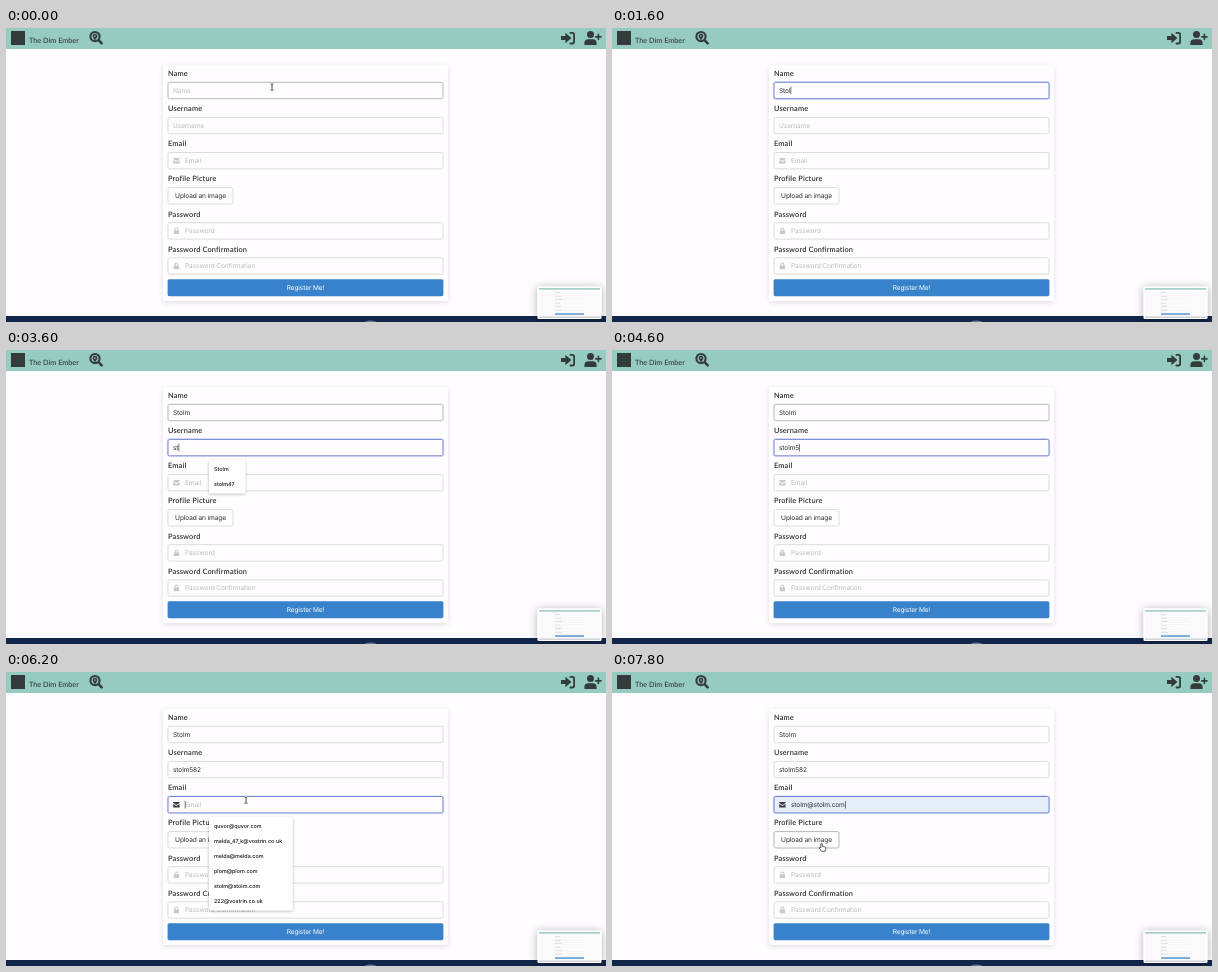
Recreate the animation shown at these times as an HTML page. Size 600x294 px, loop 8 s.

```html
<!DOCTYPE html>
<html lang="en">
<head>
<meta charset="utf-8">
<title>Registration form</title>
<style>
  html, body { margin: 0; width: 100%; height: 100%; overflow: hidden; background: #fefcfe; }
  svg { display: block; width: 600px; height: 294px; }
  text { font: 400 6.6px Inter, Roboto, sans-serif; letter-spacing: -.12px; fill: #2c2c2c; white-space: pre; text-rendering: geometricPrecision; }
  .label { font: 600 7.4px Lato, "Open Sans", sans-serif; letter-spacing: .14px; }
  .brand { font: 400 7.3px Lato, "Open Sans", sans-serif; letter-spacing: 0; }
  .option { font-weight: 500; font-size: 5.4px; letter-spacing: 0; fill: #111; }
  .middle { text-anchor: middle; }
  .hint { fill: #b9b9bb; }
  .box { fill: #fffdff; stroke: #d8d8da; stroke-width: .9; }
  .box.hover { stroke: #aeaeb2; }
  .box.focus { stroke: #6478cc; }
  .box.filled { fill: #e6eefc; }
  .ring { fill: none; stroke: #4a6fdc; stroke-opacity: .16; stroke-width: 1; }
  .icon { fill: #c9c9cb; }
  .icon.focus { fill: #3c3c3c; }
  .ink { fill: #343b3b; }
  .line { fill: none; stroke: #343b3b; }
</style>
</head>
<body>
<svg id="stage" viewBox="0 0 600 294">
  <defs>
    <filter id="soft" x="-20%" y="-20%" width="140%" height="140%">
      <feDropShadow dx="0" dy="1.5" stdDeviation="2.6" flood-color="#0a0a0a" flood-opacity=".12"/>
    </filter>
    <filter id="lift" x="-30%" y="-30%" width="160%" height="160%">
      <feDropShadow dx="0" dy="1" stdDeviation="1.5" flood-color="#000" flood-opacity=".3"/>
    </filter>
    <filter id="halo" x="-40%" y="-60%" width="180%" height="220%">
      <feDropShadow dx="0" dy="1" stdDeviation="4" flood-color="#000" flood-opacity=".32"/>
    </filter>
  </defs>

  <rect width="600" height="294" fill="#fefcfe"/>
  <rect width="600" height="21" fill="#95cbc1"/>
  <rect class="ink" x="5" y="3" width="14" height="14"/>
  <text class="brand" x="23" y="14.8">The Dim Ember</text>

  <circle class="line" cx="89" cy="8.6" r="4.6" stroke-width="2.1"/>
  <path class="ink" fill-rule="evenodd" d="M89 12.2c-1.4-1.8-2.4-2.8-2.4-4.1a2.4 2.4 0 0 1 4.8 0c0 1.3-1 2.3-2.4 4.1zM89 7.3a.8.8 0 1 0 0 1.6a.8.8 0 0 0 0-1.6z"/>
  <path class="line" stroke-width="2.5" stroke-linecap="round" d="M92.8 12.4l2.9 2.9"/>

  <path class="ink" d="M555 8.1h4.4V4.7l6 5.3-6 5.3v-3.4H555z"/>
  <path class="line" stroke-width="1.8" stroke-linecap="round" d="M564.4 4.9h2a1.7 1.7 0 0 1 1.7 1.7v7.2a1.7 1.7 0 0 1-1.7 1.7h-2"/>
  <circle class="ink" cx="584.5" cy="6.6" r="3.5"/>
  <path class="ink" d="M578.4 17v-1.8a4 4 0 0 1 4-4h4.2a4 4 0 0 1 4 4V17z"/>
  <path class="line" stroke-width="1.6" stroke-linecap="round" d="M592.4 6.3v5.2M589.8 8.9h5.2"/>

  <rect x="157" y="37" width="285" height="236" rx="2.6" fill="#fffdff" filter="url(#soft)"/>
  <g id="form"></g>
  <rect x="161.6" y="251.2" width="275.8" height="17" rx="1.6" fill="#3782cb"/>
  <text class="middle" x="299.5" y="262.3" style="fill:#fff">Register Me!</text>

  <rect y="288" width="600" height="6" fill="#12264a"/>
  <ellipse cx="364.5" cy="297.4" rx="8" ry="5" fill="#68748a"/>

  <g id="list"></g>

  <g id="thumb">
    <rect x="531.5" y="258.5" width="64" height="32.5" rx="1.5" fill="#fff" filter="url(#halo)"/>
    <rect x="533" y="260" width="61" height="29.4" fill="#fbf9fb"/>
    <rect x="533" y="260" width="61" height="1.7" fill="#a5cfc7"/>
    <rect x="533" y="288.8" width="61" height=".6" fill="#8b95a5"/>
    <rect x="549" y="285.2" width="29" height="1.7" fill="#6aa2d8"/>
  </g>
  <g id="mouse"></g>
</svg>
<script>
const $ = id => document.getElementById(id);

function add(parent, tag, attrs, text) {
  const node = document.createElementNS("http://www.w3.org/2000/svg", tag);
  for (const k in attrs) node.setAttribute(k, attrs[k]);
  if (text !== undefined) node.textContent = text;
  return parent.appendChild(node);
}
const show = (node, on) => node.setAttribute("visibility", on ? "visible" : "hidden");

const MAIL = "M167.2 -2.6h6.4v.9l-3.2 2.1-3.2-2.1zM167.2 -.7l3.2 2 3.2-2v3.5h-6.4z";
const LOCK = "M167.7 -.5h.8v-1a1.9 1.9 0 0 1 3.8 0v1h.8v3.7h-5.4zM169.5 -.5h1.8v-1a.9.9 0 0 0-1.8 0z";

const specs = [
  ["Name"], ["Username"], ["Email", MAIL], ["Profile Picture"],
  ["Password", LOCK], ["Password Confirmation", LOCK]
];
const UPLOAD = 3;

const fields = specs.map(([name, icon], i) => {
  const y = 62.5 + 35.1 * i, form = $("form"), button = i === UPLOAD;
  const f = { name, y, x: icon ? 179 : 167, w: button ? 65 : 275 };
  add(form, "text", { class: "label", x: 162, y: y - 14.4 }, name);
  f.ring = add(form, "rect", { class: "ring", x: 161.2, y: y - 9, width: f.w + 1.6, height: 18, rx: 2.2 });
  f.box = add(form, "rect", { class: "box", x: 162, y: y - 8.2, width: f.w, height: 16.4, rx: 1.6 });
  if (icon) f.icon = add(form, "path", { class: "icon", d: icon, "fill-rule": "evenodd", transform: `translate(0 ${y})` });
  f.text = add(form, "text", { x: button ? 194.5 : f.x, y: y + 2.4, class: button ? "middle" : "" });
  if (button) f.text.textContent = "Upload an image";
  return f;
});
const caret = add($("form"), "rect", { width: .6, height: 7.6, fill: "#222" });

const options = [
  ["Sefir", "Sel Ombra Hotel", "Sel Ombra Hotel and Apartments", "SLEDPUFF", "sefir", "studio"],
  ["Stolm", "stolm47"],
  ["quvor@quvor.com", "melda_47_k@vostrin.co.uk", "melda@melda.com", "plom@plom.com", "stolm@stolm.com", "222@vostrin.co.uk"]
];

const shapes = {
  beam: ["M-1.5 -3.2q1.5 0 1.5 1v4.6q0 1 -1.5 1M1.5 -3.2q-1.5 0 -1.5 1M1.5 3.4q-1.5 0 -1.5 -1", "none", "#222", .8],
  arrow: ["M0 0v7.4l1.8-1.6 1.2 2.8 1.3-.6-1.2-2.6h2.3z", "#111", "#fff", .6],
  hand: ["M-1.2 -3.2q.8-.8 1.4 0v2.6l2.6.5q1.2.4 1 1.6l-.6 2.8h-3.6l-2.4-3.2q-.2-1 .8-.7l.8.6z", "#fff", "#222", .7]
};

// Each cue changes part of the state; earlier values persist.
const cues = [
  [0, { focus: -1, caret: 0, open: 0, row: -1, mouse: ["beam", 266, 59] }],
  [200, { focus: 0 }],
  [400, { caret: 1 }],
  [800, { mouse: ["", 266, 59] }],
  [1000, { open: 1 }],
  [2000, { open: 0, caret: 0 }],
  [2200, { focus: 1, caret: 1 }],
  [2800, { caret: 0 }],
  [3200, { caret: 1 }],
  [3400, { open: 1 }],
  [5200, { caret: 0 }],
  [5400, { caret: 1, open: 0 }],
  [5600, { mouse: ["beam", 262, 74] }],
  [5800, { mouse: ["beam", 250, 106] }],
  [6000, { mouse: ["beam", 240, 128], focus: 2 }],
  [6200, { open: 1 }],
  [6400, { mouse: ["arrow", 238, 146] }],
  [6600, { mouse: ["arrow", 235, 183], row: 2 }],
  [6800, { mouse: ["arrow", 232, 213], row: 4 }],
  [7000, { open: 0, row: -1 }],
  [7200, { mouse: ["arrow", 224, 193] }],
  [7400, { mouse: ["hand", 214, 173] }],
  [7600, { mouse: ["hand", 210, 175] }]
];

const typed = (word, from, t) => word.slice(0, Math.max(0, Math.floor((t - from) / 200) + 1));

function stateAt(t) {
  const s = Object.assign({}, ...cues.filter(c => c[0] <= t).map(c => c[1]));
  s.values = [
    typed("Stolm", t < 1000 ? 800 : 1000, t),
    t < 4400 ? typed("stolm", 3400, t) : "stolm" + typed("582", 4600, t),
    t >= 7000 ? "stolm@stolm.com" : s.row >= 0 ? options[2][s.row] : ""
  ];
  return s;
}

function drawList(s) {
  const list = $("list");
  list.textContent = "";
  if (!s.open) return;
  const f = fields[s.focus];
  const prefix = s.row < 0 ? s.values[s.focus].toLowerCase() : "";
  const rows = options[s.focus].filter(o => o.toLowerCase().startsWith(prefix));
  if (!rows.length) return;
  const top = f.y + 12.6;
  const panel = add(list, "rect", { x: 203, y: top, height: rows.length * 15 + 3, rx: 1, fill: "#fff", filter: "url(#lift)" });
  const bar = add(list, "rect", { x: 203, y: top + 1.5 + s.row * 15, height: 15, fill: "#e9e9eb" });
  show(bar, s.row >= 0);
  const widths = rows.map((row, i) =>
    add(list, "text", { class: "option", x: 208, y: top + 11 + i * 15 }, row).getComputedTextLength());
  for (const node of [panel, bar]) node.setAttribute("width", Math.max(...widths) + 15.5);
}

function drawMouse([kind, x, y]) {
  const g = $("mouse");
  g.textContent = "";
  if (!kind) return;
  const [d, fill, stroke, w] = shapes[kind];
  if (kind === "beam") add(g, "path", { d, fill, stroke: "#fff", "stroke-width": 1.8 });
  add(g, "path", { d, fill, stroke, "stroke-width": w });
  g.setAttribute("transform", `translate(${x} ${y})`);
}

function draw(t) {
  const s = stateAt(t), [kind, mx, my] = s.mouse;
  fields.forEach((f, i) => {
    const focus = i === s.focus, value = s.values[i];
    const hover = kind !== "arrow" && Math.abs(my - f.y) < 8.3 && mx < 162 + f.w;
    f.box.setAttribute("class", "box" + (hover ? " hover" : "") + (focus ? " focus" : "") + (i === 2 && value ? " filled" : ""));
    show(f.ring, focus);
    if (f.icon) f.icon.setAttribute("class", focus ? "icon focus" : "icon");
    if (i === UPLOAD) return;
    f.text.textContent = value || f.name;
    f.text.setAttribute("class", value ? "" : "hint");
  });
  const active = fields[s.focus];
  show(caret, active && s.caret && s.row < 0);
  if (active) {
    const value = s.values[s.focus];
    caret.setAttribute("x", active.x + (value ? active.text.getComputedTextLength() + .2 : -.2));
    caret.setAttribute("y", active.y - 3.8);
  }
  drawList(s);
  drawMouse(s.mouse);
}

// Miniature of the form in the corner preview.
for (let i = 0; i < 6; i++) {
  const y = 264.4 + i * 3.5;
  add($("thumb"), "rect", { x: 549, y, width: 5 + i % 3, height: .5, fill: "#c6c6c9" });
  add($("thumb"), "rect", { x: 549, y: y + 1.2, width: i === UPLOAD ? 7 : 29, height: 1.5, fill: "#fff", stroke: "#e6e6e8", "stroke-width": .3 });
}

let last = -1;
const start = performance.now();
function tick() {
  const step = Math.floor(((performance.now() - start) % 8000) / 200);
  if (step !== last) draw((last = step) * 200);
  requestAnimationFrame(tick);
}
tick();
</script>
</body>
</html>
```
